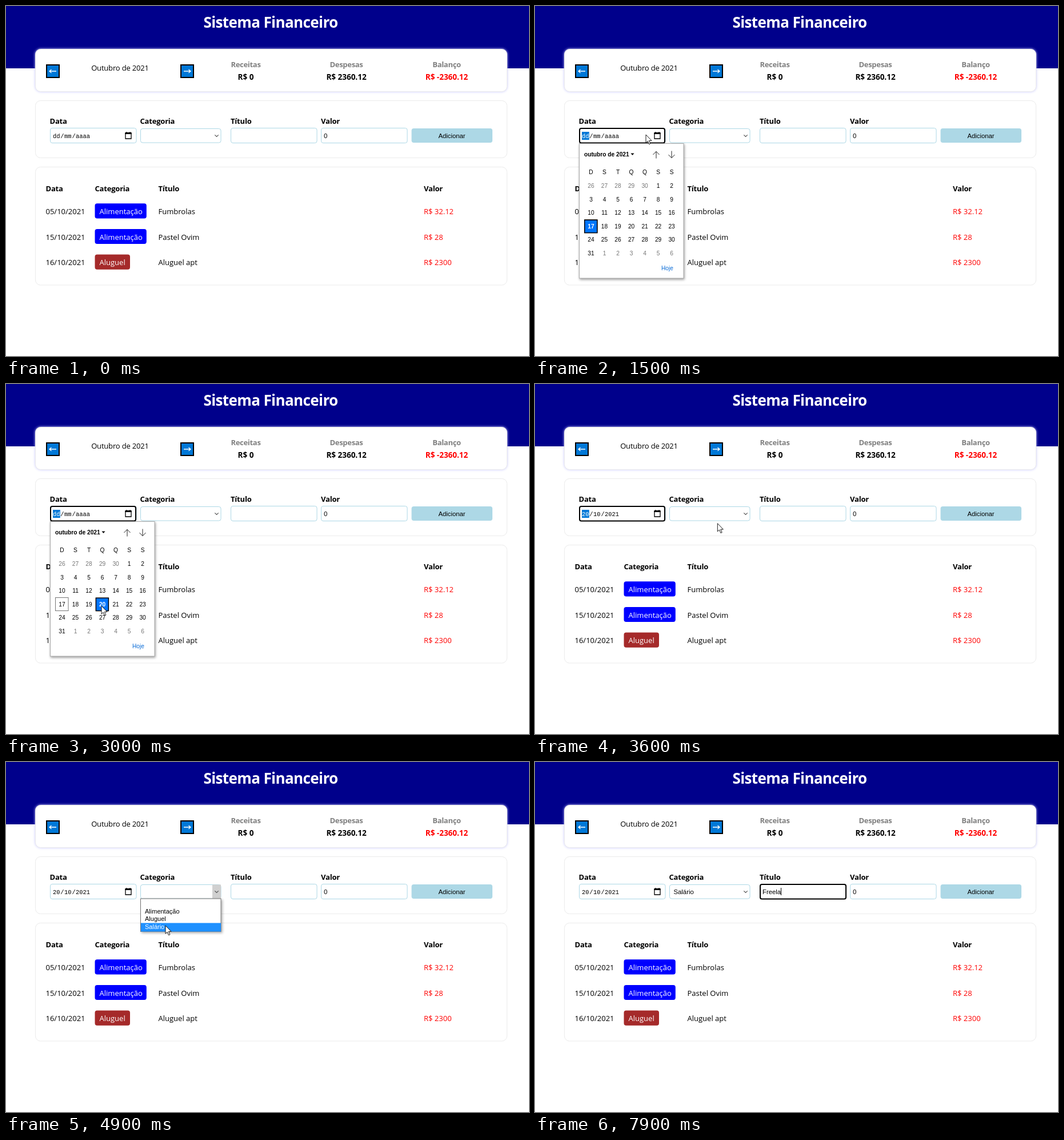
An HTML page that plays this animation: 915x612 px, repeating every 8000 ms.

```html
<!DOCTYPE html>
<html lang="pt">
<head>
<meta charset="utf-8">
<title>Sistema Financeiro</title>
<style>
html, body { margin: 0; width: 100%; height: 100%; overflow: hidden; background: #fff; }
svg { display: block; width: 100%; height: 100%; }
text { font: 13px "Open Sans", "Noto Sans", sans-serif; white-space: pre; }
.title { font-size: 26px; font-weight: 700; fill: #fff; letter-spacing: -.6px; }
.head { font-weight: 700; letter-spacing: -.2px; }
.sum { font-weight: 700; fill: #808080; letter-spacing: -.3px; }
.total { font-size: 13.5px; font-weight: 700; }
.month { letter-spacing: -.17px; }
.red { fill: #f00; }
.white { fill: #fff; }
.mid { text-anchor: middle; }
.ui { font: 11.33px "Liberation Sans", Arial, sans-serif; }
.item { font: 11px "Liberation Sans", Arial, sans-serif; }
.mono { font: 10.4px "Liberation Mono", monospace; }
.cal { font: 10.2px "Liberation Sans", Arial, sans-serif; }
.bold { font-weight: 700; }
.dim { fill: #767676; }
.card { fill: #fff; stroke: #ebebeb; }
.glow { filter: drop-shadow(0 0 2px #c8c8ff); }
.field { fill: #fff; stroke: #add8e6; }
.ring { fill: none; stroke: #000; stroke-width: 2; }
.line { fill: none; stroke: #222; }
.pop { fill: #fff; stroke: #aaa; filter: drop-shadow(1px 2px 2px #0006); }
.list { fill: #fff; stroke: #767676; filter: drop-shadow(2px 2px 2px #0005); }
</style>
</head>
<body>
<svg id="stage" viewBox="0 0 915 612"></svg>
<script>
const text = (x, y, s, cls = '') => `<text x="${x}" y="${y}" class="${cls}">${s}</text>`;
const rect = (x, y, w, h, attrs, r = 0) =>
  `<rect x="${x}" y="${y}" width="${w}" height="${h}" rx="${r}" ${attrs}/>`;
const path = (d, attrs = 'class="line"') => `<path d="${d}" ${attrs}/>`;
const group = (id, body) => `<g id="${id}">${body}</g>`;

const arrowButton = (x, dir) =>
  rect(x + 1, 103, 22, 22, 'fill="#0078d7" stroke="#000" stroke-width="2"') +
  path(`M${x + 12 - 6 * dir} 114h${12 * dir}m${-3.5 * dir} -3l${3.5 * dir} 3l${-3.5 * dir} 3`,
    'fill="none" stroke="#fff" stroke-width="1.3"');

function summary() {
  const cols = [[419.5, 'Receitas', 'R$ 0', ''], [595.5, 'Despesas', 'R$ 2360.12', ''],
    [771, 'Balanço', 'R$ -2360.12', 'red']];
  return rect(51.5, 75.5, 825, 74, 'class="card glow"', 9) +
    arrowButton(70, -1) + arrowButton(305, 1) +
    text(199.5, 112.5, 'Outubro de 2021', 'month mid') +
    cols.map(([x, name, sum, cls]) =>
      text(x, 107, name, 'sum mid') + text(x, 129, sum, 'total mid ' + cls)).join('');
}

function form() {
  return rect(51.5, 165.5, 825, 100, 'class="card"', 9) +
    text(76.5, 205.5, 'Data', 'head') + text(234.5, 206, 'Categoria', 'head') +
    text(393, 205.5, 'Título', 'head') + text(551, 205.5, 'Valor', 'head') +
    [77, 393, 551].map(x => rect(x + .5, 213.5, 150.5, 26, 'class="field"', 3.5)).join('') +
    rect(235.5, 214.5, 140.5, 24.5, 'class="field"', 3.5) +
    rect(709.5, 214, 141.5, 25, 'fill="#add8e6"', 4) +
    text(780, 230.5, 'Adicionar', 'ui mid') + text(556, 230.5, '0', 'ui') +
    rect(82, 220, 12.8, 14, 'id="ddMark" fill="#0078d7"') +
    text(82, 230.5, '', 'mono day') + text(95.2, 230.5, '/', 'mono') +
    text(102, 230.5, '', 'mono month2') + text(115.5, 230.5, '/', 'mono') +
    text(122, 230.5, '', 'mono year') +
    path('M209 222.5h10v9.5h-10zM208.5 222.5h11M211 220v2M217 220v2', 'fill="none" stroke="#000" stroke-width="1.3"') +
    rect(208.5, 221, 11, 3, '') +
    rect(361, 214.5, 15, 24.5, 'id="arrowBox" fill="#d0d0d0"') +
    path('M365.3 225.3l3.2 3.2l3.2 -3.2', 'fill="none" stroke="#555" stroke-width="1.2"') +
    text(242.5, 230.5, 'Salário', 'ui picked') + text(398, 230.5, '', 'ui typed') +
    rect(398, 220, 1, 13, 'id="caret"') +
    rect(78, 214, 149, 25.5, 'id="dateRing" class="ring"', 3) +
    rect(236, 215, 139.5, 23.5, 'id="selectRing" class="ring"', 3) +
    rect(394, 214, 150, 25.5, 'id="titleRing" class="ring"', 3);
}

function table() {
  const heads = [[69.5, 'Data'], [155.5, 'Categoria'], [266.5, 'Título'], [731, 'Valor']];
  const rows = [['05', 'Alimentação', 'Fumbrolas', '32.12'], ['15', 'Alimentação', 'Pastel Ovim', '28'],
    ['16', 'Aluguel', 'Aluguel apt', '2300']];
  return rect(51.5, 281.5, 825, 206.5, 'class="card"', 9) +
    heads.map(([x, s]) => text(x, 323.5, s, 'head')).join('') +
    rows.map(([day, tag, name, value], i) => {
      const y = 364 + i * 44.6, rent = tag === 'Aluguel';
      return text(69.5, y, day + '/10/2021') +
        rect(155.5, y - 18.7, rent ? 61.5 : 90.3, 26.2, `fill="${rent ? '#a52a2a' : '#00f'}"`, 4) +
        text(163.5, y, tag, 'white') + text(266.5, y, name) + text(731, y, 'R$ ' + value, 'red');
    }).join('');
}

const cell = n => [98 + (n % 7) * 23.52, 314.3 + Math.floor(n / 7) * 23.6];

function calendar() {
  let s = rect(77.5, 240.5, 182.5, 235.5, 'class="pop"') +
    text(86, 262.8, 'outubro de 2021', 'cal bold') + path('M167.5 257.5h6l-3 3.5z', '') +
    path('M212 266.5v-12m-5.5 5.5l5.5 -5.7l5.5 5.7M239 253.5v12m-5.5 -5.5l5.5 5.7l5.5 -5.7') +
    text(231.5, 462, 'Hoje', 'cal mid" fill="#0a6cd6');
  [...'DSTQQSS'].forEach((d, i) => s += text(cell(i)[0], 293.8, d, 'cal mid'));
  s += rect(86.5, 373.5, 22.5, 23, 'fill="none" stroke="#767676"') +
    rect(0, 0, 22, 22.5, 'id="pick" fill="#0075ff" stroke="#000" stroke-width="1.5"');
  for (let n = 0; n < 42; n++) {
    const [x, y] = cell(n), d = n - 4;
    const label = d < 1 ? d + 30 : d > 31 ? d - 31 : d;
    s += text(x, y + 3.7, label, 'cal mid' + (label === d ? ` d${d}` : ' dim'));
  }
  return group('calendar', s);
}

const rowTops = [239.5, 254, 267.5, 281.5, 296.5];
const options = ['', 'Alimentação', 'Aluguel', 'Salário'];
const dropdown = () => group('dropdown',
  rect(235.5, 239, 140.5, 57.5, 'class="list"') + rect(236, 0, 140, 15, 'id="hover" fill="#1e90ff"') +
  options.map((s, i) => text(243, rowTops[i] + 10.7, s, 'item option')).join(''));

const stage = document.getElementById('stage');
stage.innerHTML = rect(0, 0, 915, 109, 'fill="#00008b"') +
  text(463, 38, 'Sistema Financeiro', 'title mid') +
  summary() + form() + table() + calendar() + dropdown() +
  group('cursor', path('M0 0V14.2L3.2 11.3L5.6 16.8L7.8 15.8L5.5 10.4H10Z',
    'fill="#fff" stroke="#000" stroke-width=".9"'));

const $ = s => stage.querySelector(s);
const show = (id, on) => $('#' + id).style.display = on ? '' : 'none';
const write = (cls, s) => $('.' + cls).textContent = s;

// time, x, y of the pointer
const route = [[100, 15, 0], [800, 194, 225], [1500, 194, 225], [2300, 167, 388], [3200, 167, 388],
  [3700, 337, 227], [3800, 337, 227], [3900, 359, 227], [4000, 359, 227], [4400, 353, 246],
  [4900, 279, 286], [5200, 279, 286], [5700, 440, 226]];
const typing = [[6900, 'F'], [7300, 'Fre'], [7600, 'Free'], [7800, 'Freel'], [7900, 'Freela']];

function pointer(t) {
  const i = route.findIndex(k => k[0] > t);
  if (i < 1) return route[i < 0 ? route.length - 1 : 0].slice(1);
  const [t0, x0, y0] = route[i - 1], [t1, x1, y1] = route[i];
  const u = (t - t0) / (t1 - t0), e = u * u * (3 - 2 * u);
  return [x0 + (x1 - x0) * e, y0 + (y1 - y0) * e];
}

function draw(t) {
  const within = (a, b) => t >= a && t < b;
  const [x, y] = pointer(t);
  show('cursor', within(100, 5700));
  $('#cursor').setAttribute('transform', `translate(${x} ${y})`);

  const dated = t >= 3000 && t >= 3100, dateFocus = within(1200, 4100);
  show('calendar', within(1200, 3100));
  show('dateRing', dateFocus);
  show('ddMark', dateFocus);
  write('day', dated ? '20' : 'dd');
  write('month2', dated ? '10' : 'mm');
  write('year', dated ? '2021' : 'aaaa');
  $('.day').style.fill = dateFocus ? '#fff' : '';

  const day = t < 3000 ? 17 : 20, [cx, cy] = cell(day + 4);
  $('#pick').setAttribute('transform', `translate(${cx - 11.2} ${cy - 11})`);
  for (const d of [17, 20]) {
    $('.d' + d).classList.toggle('white', d === day);
    $('.d' + d).classList.toggle('bold', d === day);
  }

  const open = within(4100, 5300);
  const row = Math.max(0, rowTops.findLastIndex(top => y >= top));
  show('dropdown', open);
  show('arrowBox', open);
  $('#hover').setAttribute('y', rowTops[row]);
  $('#hover').setAttribute('height', (rowTops[row + 1] || 296.5) - rowTops[row]);
  stage.querySelectorAll('.option').forEach((o, i) => o.classList.toggle('white', i === row));
  $('.picked').style.display = t >= 5300 ? '' : 'none';
  show('selectRing', within(5300, 6000));

  const typed = typing.findLast(k => t >= k[0])?.[1] || '';
  write('typed', typed);
  show('titleRing', t >= 6000);
  show('caret', within(6000, 6500) || t >= 6900);
  $('#caret').setAttribute('x', Math.round(398 + $('.typed').getComputedTextLength() - .4));
}

const start = performance.now();
function tick() {
  const t = (performance.now() - start) % 8000;
  draw(Math.floor(t / 100) * 100);
  requestAnimationFrame(tick);
}
tick();
</script>
</body>
</html>
```
